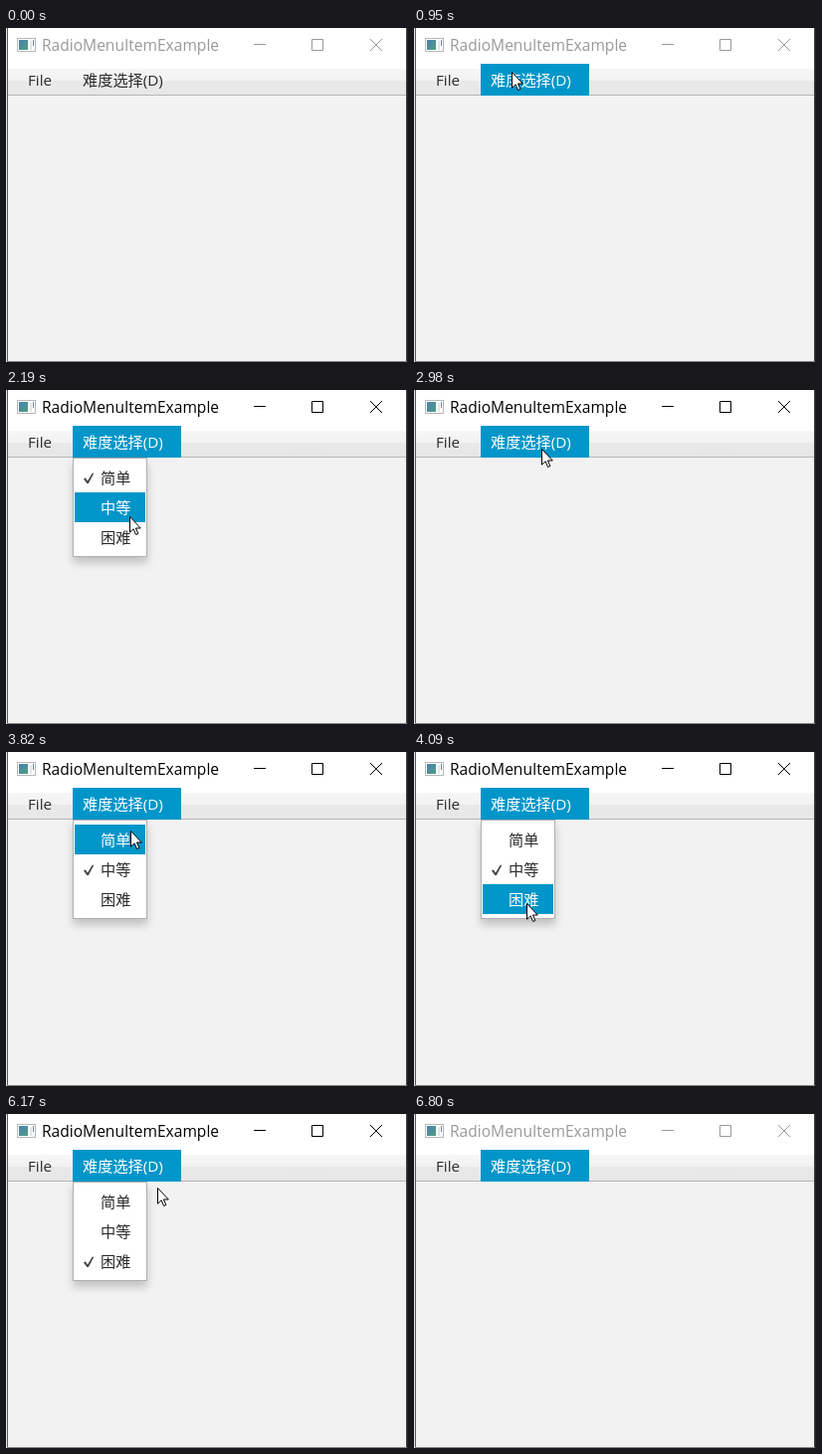
An HTML page for the animation above (6.9 s loop, 404 by 336 pixels).

```html
<!DOCTYPE html>
<html lang="zh-CN">
<head>
<meta charset="utf-8">
<title>RadioMenuItemExample</title>
<style>
  html, body { margin: 0; width: 100%; height: 100%; overflow: hidden; background: #f2f2f2; }
  svg { display: block; font: 15.2px "Open Sans", "Noto Sans CJK SC", "Noto Sans CJK", sans-serif; fill: #2b2b2b; }
  .caption { color: #999; }
  .caption.active { color: #000; }
  .caption text { font-size: 15.55px; fill: currentColor; }
  .caption path { fill: none; stroke: currentColor; }
  .hot { fill: transparent; }
  .selected .hot { fill: #0096c9; }
  .selected text { fill: #fff; }
  #popup { filter: drop-shadow(0 6px 4px rgba(0, 0, 0, .2)); }
</style>
</head>
<body>
<svg width="404" height="336" viewBox="0 0 404 336">
  <defs>
    <linearGradient id="bar" x2="0" y2="1">
      <stop offset="0" stop-color="#f6f6f6"/>
      <stop offset=".46" stop-color="#f2f2f2"/>
      <stop offset=".46" stop-color="#e9e9e9"/>
      <stop offset="1" stop-color="#e7e7e7"/>
    </linearGradient>
    <linearGradient id="pane" x2="1" y2="1">
      <stop offset="0" stop-color="#4a7fb5"/>
      <stop offset="1" stop-color="#4fa07a"/>
    </linearGradient>
  </defs>

  <rect width="404" height="336" fill="#f2f2f2"/>
  <rect width="404" height="41" fill="#fff"/>
  <rect y="41" width="404" height="26" fill="url(#bar)"/>
  <rect y="67" width="404" height="1" fill="#b5b5b5"/>

  <g id="icon">
    <rect x="11.5" y="10.5" width="18" height="13" fill="#fff" stroke="#b4b8ba"/>
    <rect x="13" y="12" width="9" height="10" fill="url(#pane)"/>
    <rect x="24" y="13" width="2" height="9" fill="#e2e5e6"/>
    <rect x="27" y="12" width="1" height="6" fill="#6f8894"/>
  </g>
  <g id="caption" class="caption">
    <text x="36" y="23">RadioMenuItemExample</text>
    <path d="M249 16.5h12M307.5 11.5h11v11h-11zM366 11l12 12M378 11l-12 12"/>
  </g>

  <text x="22" y="58">File</text>
  <g id="menu">
    <rect class="hot" x="67" y="36" width="109" height="32"/>
    <text x="77" y="58">难度选择(D)</text>
  </g>

  <rect width="1" height="336" fill="#e4e4e4"/>
  <path d="M1.5 0v336" stroke="#5c5c5c"/>
  <path d="M402.5 0v336" stroke="#444"/>
  <path d="M403.5 0v336" stroke="#222"/>
  <path d="M1 335.5h402" stroke="#8a8a8a"/>

  <g id="popup">
    <rect x="67.5" y="68.5" width="74" height="99" fill="#fff" stroke="#b0b0b0"/>
    <path id="check" d="M78 89.500l1.700-1.200 2.300 3.200L86.800 83.500l1.400.6L82.900 94h-1.500z" fill="#444"/>
  </g>
  <path id="cursor" d="M.5.5v15.700l3.600-3.400 2.500 5.700 2.300-1-2.500-5.500h4.900z" fill="#fff" stroke="#000"/>
</svg>
<script>
const LOOP = 6900, TICK = 135;
const byId = id => document.getElementById(id);
const caption = byId('caption'), menu = byId('menu'), popup = byId('popup');
const check = byId('check'), cursor = byId('cursor');

// Each stroke carries the pointer from where the last one ended; "via" bends it.
const home = [148, -20];
const strokes = [
  { start: 395, end: 1070, via: [21, 10], to: [107, 48] },
  { start: 1740, end: 2190, to: [124, 127] },
  { start: 2620, end: 2980, to: [128, 59] },
  { start: 3675, end: 4090, to: [113, 152] },
  { start: 4950, end: 5620, via: [235, 235], to: [137, 56] },
  { start: 6040, end: 6690, to: [393, 365] }
];
const activeSpan = [1340, 6800];
const menuOpen = [[1460, 2620], [3510, 4710], [5770, LOOP]];

const within = ([from, to], value) => value >= from && value < to;
const ease = p => p * p * p * (p * (6 * p - 15) + 10);

// The pointer is seen only at whole ticks of a stroke.
function pointerAt(t) {
  let from = home;
  for (const { start, end, via, to } of strokes) {
    if (t < start) break;
    if (t < end) {
      const ticks = Math.round((end - start) / TICK);
      const p = ease(Math.floor((t - start) / (end - start) * ticks) / ticks);
      return from.map((a, i) => {
        const bend = via ? via[i] : (a + to[i]) / 2;
        return Math.round((1 - p) ** 2 * a + 2 * p * (1 - p) * bend + p * p * to[i]);
      });
    }
    from = to;
  }
  return from;
}

const items = ['简单', '中等', '困难'].map((label, row) => {
  const item = document.createElementNS('http://www.w3.org/2000/svg', 'g');
  item.setAttribute('transform', `translate(69 ${73 + 30 * row})`);
  item.innerHTML = `<rect class="hot" width="71" height="30"/><text x="26" y="21">${label}</text>`;
  popup.insertBefore(item, check);
  return item;
});

function draw(t) {
  const [x, y] = pointerAt(t);
  const active = within(activeSpan, t);
  const open = menuOpen.some(span => within(span, t));
  const overMenu = within([67, 176], x) && within([36, 68], y);
  const hovered = within([69, 140], x) ? Math.floor((y - 73) / 30) : -1;
  const checked = menuOpen.filter(([, closed]) => t >= closed).length;

  cursor.setAttribute('transform', `translate(${x} ${y})`);
  caption.classList.toggle('active', active);
  menu.classList.toggle('selected', open || overMenu);
  popup.style.display = open && active ? '' : 'none';
  items.forEach((item, row) => item.classList.toggle('selected', row === hovered));
  check.setAttribute('transform', `translate(0 ${30 * checked})`);
}

const start = performance.now();
function tick() {
  draw((performance.now() - start) % LOOP);
  requestAnimationFrame(tick);
}
tick();
</script>
</body>
</html>
```
